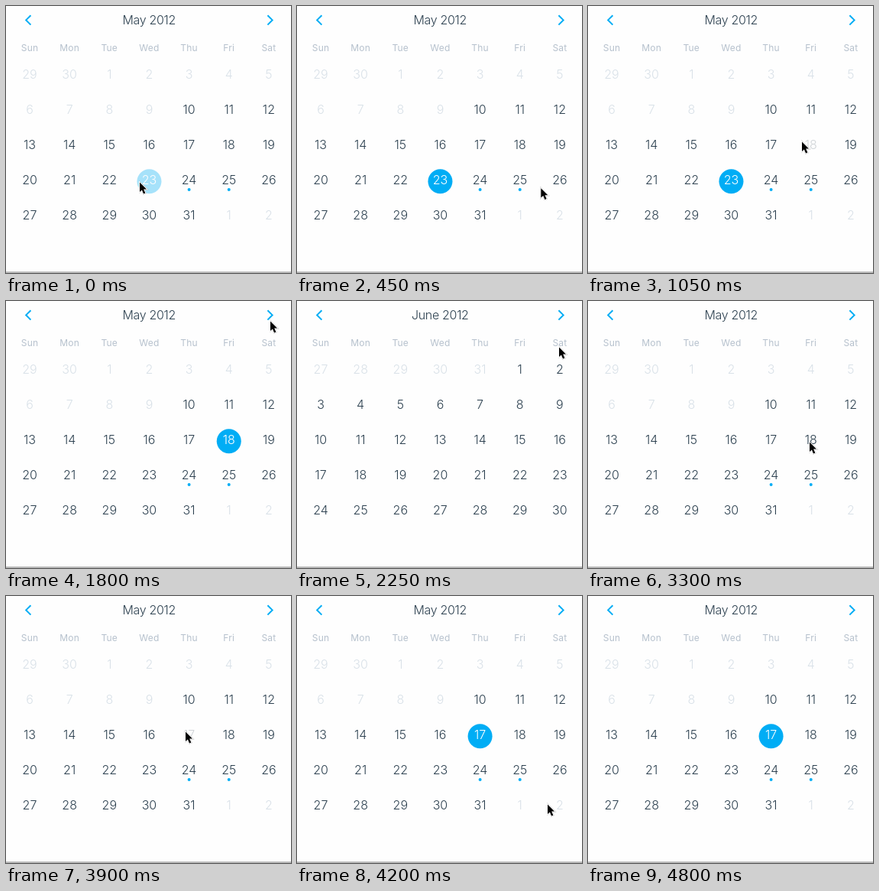
These frames come from a looping animation (373 px wide and 349 px high, 5.25 s). An HTML page:

```html
<!DOCTYPE html>
<html lang="en">
<head>
<meta charset="utf-8">
<title>Calendar</title>
<style>
  html, body { margin: 0; width: 100%; height: 100%; overflow: hidden; background: #fefefe; }
  svg { display: block; }
  text { font-family: Inter, "Open Sans", sans-serif; text-anchor: middle; fill: #2d4150; }
  .day { font-size: 16px; font-weight: 300; }
  .title { font-size: 16px; font-weight: 300; letter-spacing: -.32px; }
  .week { font-size: 12px; letter-spacing: .2px; fill: #b6c1cd; }
  .off { fill: #d9e1e8; }
  .arrow { fill: none; stroke: #00adf5; stroke-width: 2; }
  .dot, .disc { fill: #00adf5; }
  .picked { fill: #fff; }
  .pointer { stroke: #fff; stroke-width: 2; paint-order: stroke; filter: drop-shadow(0 .6px .7px #0008); }
</style>
</head>
<body>
<svg id="stage" width="373" height="349" viewBox="0 0 373 349"></svg>
<script>
const STEP = 150, STEPS = 35;
const stage = document.getElementById('stage');

function add(parent, tag, attrs, text) {
  const el = document.createElementNS('http://www.w3.org/2000/svg', tag);
  for (const key in attrs) el.setAttribute(key, attrs[key]);
  if (text !== undefined) el.textContent = text;
  parent.appendChild(el);
  return el;
}

const colX = col => 31 + 52.15 * col;
const rowY = row => 95 + 46 * row;

add(stage, 'rect', { width: 373, height: 349, fill: '#fefefe' });
add(stage, 'rect', { y: 347, width: 373, height: 2, fill: '#bbb' });
'Sun Mon Tue Wed Thu Fri Sat'.split(' ').forEach((name, i) =>
  add(stage, 'text', { class: 'week', x: colX(i), y: 58.6 }, name));

const arrow = (x, dx) => add(stage, 'path', { class: 'arrow', d: `M${x} 12.2l${dx} 6.2l${-dx} 6.2` });
const prev = arrow(32.4, -6.2);
const next = arrow(342.4, 6.2);

// Five weeks; lead = days shown from the month before.
function month(title, lead, lastBefore, length, firstOpen, marked) {
  const group = add(stage, 'g', {});
  const days = {};
  add(group, 'text', { class: 'title', x: 187.3, y: 24 }, title);
  for (let i = 0; i < 35; i++) {
    const n = i - lead + 1;
    const inside = n >= 1 && n <= length;
    const label = n < 1 ? lastBefore + n : inside ? n : n - length;
    const x = colX(i % 7), y = rowY(Math.floor(i / 7));
    const cell = add(group, 'g', {});
    const disc = add(cell, 'circle', { class: 'disc', cx: x, cy: y - 3.8, r: 16 });
    const open = inside && n >= firstOpen;
    const text = add(cell, 'text', { class: open ? 'day' : 'day off', x, y }, label);
    if (marked.includes(n)) add(cell, 'circle', { class: 'dot', cx: x, cy: y + 6.9, r: 2 });
    disc.style.display = 'none';
    if (inside) days[n] = { cell, disc, text };
  }
  return { group, days };
}

const may = month('May 2012', 2, 30, 31, 10, [24, 25]);
const june = month('June 2012', 5, 31, 30, 1, []);

const pointer = add(stage, 'path', {
  class: 'pointer', d: 'M1 1.6V14L3.9 11.4L6.1 16.4L8.3 15.4L6.2 10.6H10Z'
});

// Each tap dims its target for one step, then takes effect.
const taps = [
  { at: -1, day: 23 },
  { at: 7, day: 18 },
  { at: 13, arrow: next, page: june },
  { at: 18, arrow: prev, page: may },
  { at: 26, day: 17 }
];

// Key places of the pointer: step, x, y.
const stops = [
  [0, 174, 229], [4, 345, 238], [7, 279, 176], [8, 279, 176], [11, 358, 50], [12, 345, 25], [14, 343, 24],
  [15, 342, 59], [18, 30, 18], [19, 30, 18], [22, 289, 183], [25, 234, 176], [27, 234, 176],
  [28, 327, 271], [29, 342, 290], [31, 311, 333]
];

function pointerAt(step) {
  const i = stops.findIndex(stop => stop[0] >= step);
  if (i < 1) return i < 0 ? null : stops[0].slice(1);
  const [t0, x0, y0] = stops[i - 1], [t1, x1, y1] = stops[i];
  const u = (step - t0) / (t1 - t0), ease = u * u * (3 - 2 * u);
  return [x0 + (x1 - x0) * ease, y0 + (y1 - y0) * ease];
}

function draw(step) {
  const done = taps.filter(tap => tap.at < step);
  const last = done[done.length - 1];
  const pressed = taps.find(tap => tap.at === step) || {};
  const page = last.page || may;

  for (const m of [may, june]) m.group.style.display = m === page ? '' : 'none';
  for (const a of [prev, next]) a.style.opacity = a === pressed.arrow ? .3 : 1;

  for (const n in may.days) {
    const { cell, disc, text } = may.days[n];
    const on = +n === last.day;
    const fresh = on && step - last.at === 1;
    disc.style.display = on ? '' : 'none';
    text.classList.toggle('picked', on);
    cell.style.opacity = fresh ? .34 : +n === pressed.day ? .22 : 1;
  }

  const tip = pointerAt(step);
  pointer.style.display = tip ? '' : 'none';
  if (tip) pointer.setAttribute('transform', `translate(${tip})`);
}

const start = performance.now();
let shown = -1;
function tick() {
  const step = Math.floor((performance.now() - start) / STEP) % STEPS;
  if (step !== shown) draw(shown = step);
  requestAnimationFrame(tick);
}
tick();
</script>
</body>
</html>
```
